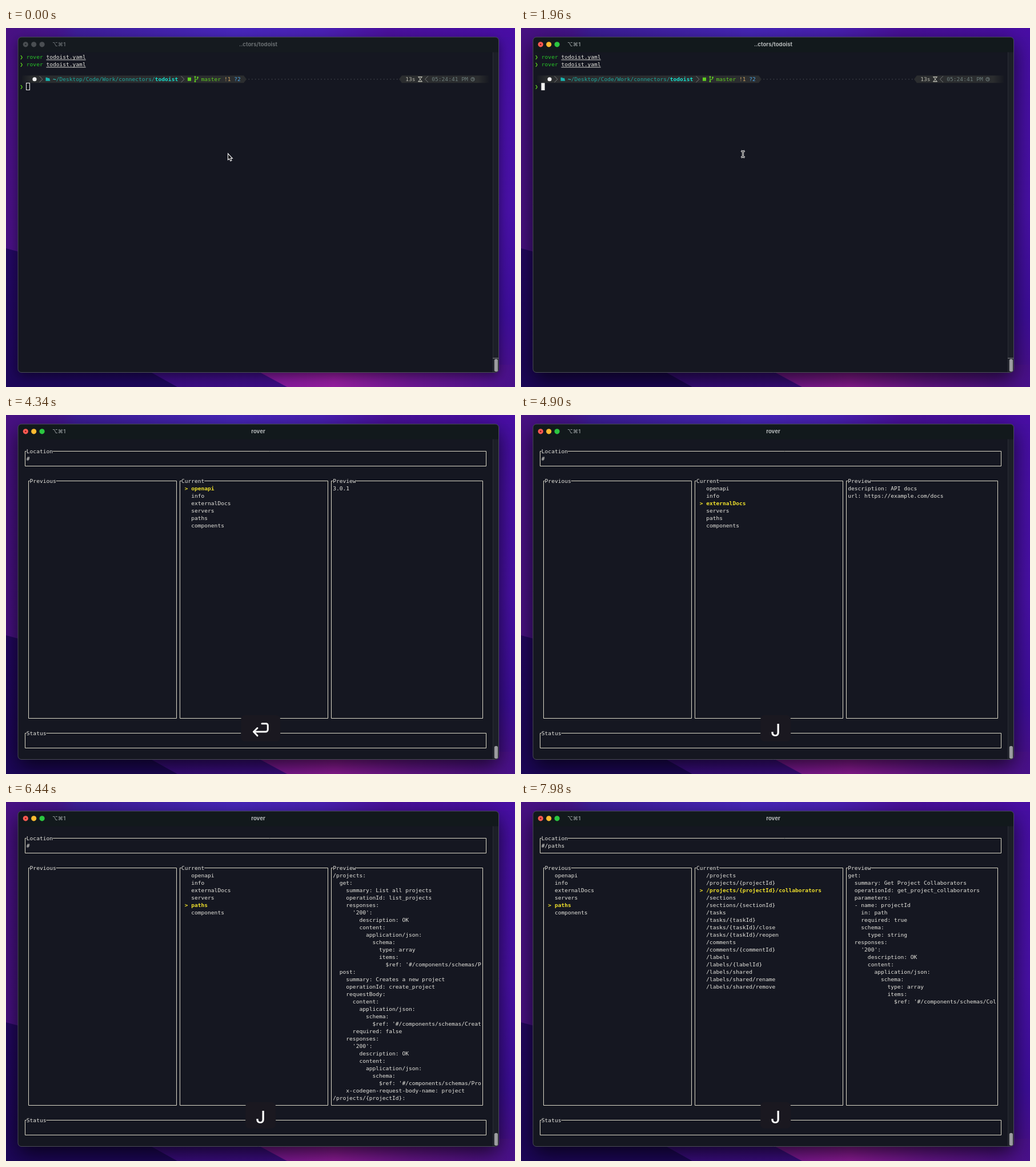
Write an HTML page with a canvas that moves like this. It is 891 px wide and 629 px high and loops after 8 s.

```html
<!DOCTYPE html>
<html lang="en">
<head>
<meta charset="utf-8">
<title>Terminal</title>
<style>
html, body { margin: 0; width: 100%; height: 100%; overflow: hidden; background: #2a0b78; }
canvas { display: block; }
</style>
</head>
<body>
<canvas id="stage" width="891" height="629"></canvas>
<script>
const ctx = document.getElementById('stage').getContext('2d');
const W = 891, H = 629, LOOP = 8000;
const CELL = 5.768, X0 = 24.3, ROW = 12.985;
const MONO = '"DejaVu Sans Mono", monospace', SANS = 'Inter, sans-serif';
const INK = '#e6e5de', FRAME = '#dcd9c8', YELLOW = '#efe02c', GREEN = '#5fd020';

const FOCUS = 1050, OPEN = 3920, ENTER = 3710, TAB = 3080, DRILL = 6510;
const TYPED = 'rover to', TYPE_START = 2100, TYPE_STEP = 115;
const ROOT_MOVES = [4620, 4900, 5180, 5460];
const PATH_MOVES = [7560, 7840];

const ROOT = ['openapi', 'info', 'externalDocs', 'servers', 'paths', 'components'];
const PATHS = ['/projects', '/projects/{projectId}', '/projects/{projectId}/collaborators',
  '/sections', '/sections/{sectionId}', '/tasks', '/tasks/{taskId}', '/tasks/{taskId}/close',
  '/tasks/{taskId}/reopen', '/comments', '/comments/{commentId}', '/labels', '/labels/{labelId}',
  '/labels/shared', '/labels/shared/rename', '/labels/shared/remove'];

const indent = (lines, n) => lines.map(s => ' '.repeat(n) + s);
const ref = name => `$ref: '#/components/schemas/${name}'`;
const content = schema => ['content:', '  application/json:', '    schema:', ...indent(schema, 6)];
const ok = schema => ['responses:', "  '200':", '    description: OK', ...indent(content(schema), 4)];
const list = name => ['type: array', 'items:', '  ' + ref(name)];
const head = (summary, id) => [`summary: ${summary}`, `operationId: ${id}`];
const param = ['parameters:', '- name: projectId', '  in: path', '  required: true',
  '  schema:', '    type: string'];

const projects = ['get:',
  ...indent([...head('List all projects', 'list_projects'), ...ok(list('Project'))], 2),
  'post:',
  ...indent([...head('Creates a new project', 'create_project'), 'requestBody:',
    ...indent(content([ref('CreateProject')]), 2), '  required: false',
    ...ok([ref('Project')]), 'x-codegen-request-body-name: project'], 2)];
const project = ['get:',
  ...indent([...head('Get a project', 'get_project'), ...param, ...ok([ref('Project')])], 2)];
const collaborators = ['get:',
  ...indent([...head('Get Project Collaborators', 'get_project_collaborators'),
    ...param, ...ok(list('Collaborator'))], 2)];

const ROOT_PREVIEW = [
  ['3.0.1'],
  ['title: REST API', 'version: 1.0.0'],
  ['description: API docs', 'url: https://example.com/docs'],
  ['- url: https://example.com/rest'],
  ['/projects:', ...indent(projects, 2), '/projects/{projectId}:']
];
const PATH_PREVIEW = [projects, project, collaborators];

// Key presses shown in the overlay
const KEYS = [
  ...[...TYPED].map((c, i) => [TYPE_START + i * TYPE_STEP, c === ' ' ? '␣' : c.toUpperCase()]),
  [TAB, 'tab'], [ENTER, 'enter'],
  ...ROOT_MOVES.map(t => [t, 'J']), [DRILL, 'L'], ...PATH_MOVES.map(t => [t, 'J'])
];

const colX = c => X0 + c * CELL;
const rowY = r => 50.8 + r * ROW;
const count = (times, t) => times.filter(k => t >= k).length;

function write(s, col, row, color = INK, bold = false) {
  ctx.font = `${bold ? 'bold ' : ''}9.58px ${MONO}`;
  ctx.textAlign = 'left';
  ctx.fillStyle = color;
  [...s].forEach((c, i) => c !== ' ' && ctx.fillText(c, colX(col + i), rowY(row) + 3.4));
}

function label(s, x, y, font, color, align = 'center') {
  ctx.font = font;
  ctx.textAlign = align;
  ctx.fillStyle = color;
  ctx.fillText(s, x, y);
}

function line(points, color, width = 1, fill) {
  ctx.beginPath();
  points.forEach(([x, y], i) => i ? ctx.lineTo(x, y) : ctx.moveTo(x, y));
  if (fill) { ctx.closePath(); ctx.fillStyle = fill; ctx.fill(); }
  if (color) { ctx.strokeStyle = color; ctx.lineWidth = width; ctx.stroke(); }
}

function dot(x, y, r, color) {
  ctx.beginPath();
  ctx.arc(x, y, r, 0, Math.PI * 2);
  ctx.fillStyle = color;
  ctx.fill();
}

function rounded(x, y, w, h, r) {
  ctx.beginPath();
  ctx.roundRect(x, y, w, h, r);
}

function ramp(x1, y1, x2, y2, ...stops) {
  const g = ctx.createLinearGradient(x1, y1, x2, y2);
  stops.forEach(([p, c]) => g.addColorStop(p, c));
  return g;
}

function wallpaper() {
  ctx.fillStyle = ramp(0, 0, W, 0, [0, '#481082'], [.1, '#45148c'], [.14, '#3d1d98'],
    [.45, '#4826bc'], [.62, '#4a20b4'], [.75, '#4a109c'], [1, '#480da4']);
  ctx.fillRect(0, 0, W, H);
  ctx.fillStyle = ramp(0, 0, 0, H, [0, '#460ea2'], [.5, '#4810a6'], [.8, '#3c0d98'], [1, '#4a1088']);
  ctx.fillRect(860, 16, 31, H);
  line([[0, 386], [60, 402], [300, 629], [0, 629]], null, 0, ramp(0, 386, 0, 629, [0, '#220760'], [1, '#1c0658']));
  line([[230, 590], [500, 590], [500, 629], [300, 629]], null, 0, ramp(260, 0, 490, 0, [0, '#3a0c80'], [1, '#3c0d82']));
  line([[420, 590], [891, 590], [891, 629], [492, 629]], null, 0,
    ramp(440, 0, 891, 0, [0, '#7c1898'], [.3, '#921c9c'], [.6, '#6a1690'], [1, '#48108a']));
}

function windowFrame(focused, title) {
  ctx.save();
  ctx.shadowColor = focused ? 'rgba(0,0,0,.72)' : 'rgba(0,0,0,.5)';
  ctx.shadowBlur = focused ? 36 : 20;
  ctx.shadowOffsetY = focused ? 12 : 6;
  rounded(21, 16, 841.5, 587.5, 6);
  ctx.fillStyle = '#151721';
  ctx.fill();
  ctx.restore();

  ctx.save();
  rounded(21, 16, 841.5, 587.5, 6);
  ctx.clip();
  ctx.fillStyle = focused ? '#12191c' : '#151a1f';
  ctx.fillRect(21, 16, 842, 26.5);
  ctx.fillStyle = '#1c1f27';
  ctx.fillRect(852, 42.5, 11, 562);
  ctx.fillStyle = '#2c2e36';
  ctx.fillRect(852, 42.5, 1, 562);
  ctx.restore();

  rounded(21, 16, 841.5, 587.5, 6);
  ctx.strokeStyle = '#4b4d57';
  ctx.lineWidth = 1;
  ctx.stroke();

  rounded(854.8, 580, 6.2, 22, 2.5);
  ctx.fillStyle = '#9b9c9f';
  ctx.fill();
  if (title !== 'rover') line([[852, 578.5], [862, 578.5]], '#85868a');

  const lights = focused ? ['#fb5a52', '#fcbb30', '#2bc740'] : ['#4a4e52', '#4a4e52', '#4a4e52'];
  lights.forEach((c, i) => dot(34.3 + i * 14.4, 28.8, 4.6, c));
  dot(34.3, 28.8, 1.2, focused ? '#7c1310' : '#202428');
  label('⌥⌘1', 81, 32.4, `600 9.6px ${SANS}`, focused ? '#8d9395' : '#686d71', 'left');
  label(title, 441.5, 32.3, `bold 9.6px ${SANS}`, focused ? '#b4b8b9' : '#696e71');
}

function promptBar() {
  const y = rowY(3), top = y - 6.6, bottom = y + 6.4, bg = '#2b2d2f';
  const left = ramp(28, 0, 46, 0, [0, '#171921'], [1, bg]);
  line([[28, top], [416, top], [421, y], [416, bottom], [28, bottom]], null, 0, left);
  const right = ramp(826, 0, 845, 0, [0, bg], [1, '#171921']);
  line([[693, top], [845, top], [845, bottom], [693, bottom], [688, y]], null, 0, right);

  const chevron = (x, d) => line([[x, top + 1], [x + 5.5 * d, y], [x, bottom - 1]], '#77797a');
  dot(50, y, 3.6, '#f2f2f2');
  chevron(58.5, 1);
  line([[69.5, y + 3], [69.5, y - 3], [72.3, y - 3], [73, y - 2], [76, y - 2], [77.3, y + 3]], null, 0, '#18b4b0');
  write('~', 10, 3, '#35dcd4', true);
  write('/Desktop/Code/Work/connectors/', 11, 3, '#1ba9a0');
  write('todoist', 41, 3, '#14e4d2', true);
  chevron(306.5, 1);
  ctx.fillStyle = GREEN;
  ctx.fillRect(318, y - 3, 6, 6);
  line([[331, y - 3.5], [331, y + 4]], GREEN, 1.1);
  line([[335.5, y - 2.5], [335.5, y - .5], [331, y + 1.5]], GREEN, 1.1);
  [[331, -4], [331, 4], [335.5, -3]].forEach(([x, d]) => dot(x, y + d, 1.4, GREEN));
  write('master', 55, 3, GREEN);
  write('!1', 62, 3, '#d0a462');
  write('?2', 65, 3, '#4ca6ea');

  for (let c = 69; c < 115; c++) {
    ctx.fillStyle = '#54575e';
    ctx.fillRect(colX(c) + 2.3, y - .6, 1.2, 1.2);
  }
  write('13s', 117, 3, '#b5b5aa');
  line([[722, y - 4], [728, y - 4], [722, y + 4], [728, y + 4], [722, y - 4]], '#c0c0b6');
  line([[721, y - 4], [729, y - 4]], '#c0c0b6');
  line([[721, y + 4], [729, y + 4]], '#c0c0b6');
  chevron(739, -1);
  write('05:24:41 PM', 125, 3, '#6c7d7c');
  ctx.beginPath();
  ctx.arc(817, y, 3.1, 0, Math.PI * 2);
  ctx.strokeStyle = '#788786';
  ctx.stroke();
  line([[817, y - 2], [817, y], [818.8, y]], '#788786');
}

function command(text, row) {
  write('❯', 0, row, GREEN);
  const word = text.slice(0, 5), rest = text.slice(6).trim();
  write(word, 2, row, word === 'rover' ? '#28c828' : '#e0524c');
  write(rest, 8, row);
  if (rest) line([[colX(8), rowY(row) + 5], [colX(8 + rest.length), rowY(row) + 5]], '#d5d5d0');
}

function mouse(focused) {
  if (focused) {
    const beam = (c, w) => {
      line([[388.5, 216.5], [388.5, 225.5]], c, w);
      [[215, 217], [227, 225]].forEach(([end, mid]) =>
        line([[385.5, end], [388.5, mid], [391.5, end]], c, w));
    };
    beam('#f4f4f4', 3);
    beam('#111', 1);
  } else {
    line([[388.5, 220], [388.5, 231], [391, 229], [393, 233], [395, 232], [393.2, 228.4],
      [396.4, 228.4], [388.5, 220]], '#f4f4f4', 1.1, '#101014');
  }
}

function shell(t) {
  const focused = t >= FOCUS;
  command('rover todoist.yaml', 0);
  command('rover todoist.yaml', 1);
  promptBar();
  const n = Math.max(0, Math.min(TYPED.length, Math.floor((t - TYPE_START) / TYPE_STEP) + 1));
  const text = t >= TAB ? 'rover todoist.yaml ' : TYPED.slice(0, n);
  command(text, 4);
  if (t < ENTER) {
    const x = colX(2 + text.length);
    ctx.fillStyle = ctx.strokeStyle = '#f2f2f2';
    ctx.lineWidth = 1;
    if (focused) ctx.fillRect(x - .4, 96.3, 6.2, 12.8);
    else ctx.strokeRect(35.5, 96.5, 6, 12);
  }
  if (t < TYPE_START) mouse(focused);
}

function panel(title, c1, r1, c2, r2) {
  const x1 = Math.round(colX(c1 + .5)) - .5 + .5, x2 = colX(c2 + .5);
  const y1 = rowY(r1) + .1, y2 = rowY(r2) + .1;
  const snap = v => Math.floor(v) + .5;
  const l = snap(x1), r = snap(x2), top = snap(y1), b = snap(y2);
  line([[colX(c1 + 1 + title.length), top], [r, top], [r, b], [l, b], [l, top], [colX(c1 + 1), top]], FRAME);
  write(title, c1 + 1, r1);
}

function menu(items, col, selected) {
  items.forEach((s, i) => {
    const on = i === selected;
    if (on) write('>', col, 6 + i, YELLOW, true);
    write(s, col + 2, 6 + i, on ? YELLOW : INK, on);
  });
}

function browser(t) {
  const inPaths = t >= DRILL;
  const root = count(ROOT_MOVES, t), path = count(PATH_MOVES, t);
  panel('Location', 1, 1, 141, 3);
  panel('Previous', 2, 5, 47, 37);
  panel('Current', 48, 5, 93, 37);
  panel('Preview', 94, 5, 140, 37);
  panel('Status', 1, 39, 141, 41);
  write(inPaths ? '#/paths' : '#', 2, 2);
  if (inPaths) menu(ROOT, 4, root);
  menu(inPaths ? PATHS : ROOT, 50, inPaths ? path : root);
  const lines = inPaths ? PATH_PREVIEW[path] : ROOT_PREVIEW[root];
  lines.slice(0, 31).forEach((s, i) => write(s.slice(0, 45), 95, 6 + i));
}

function keyOverlay(t) {
  const last = KEYS.filter(k => t >= k[0]).pop();
  if (!last) return;
  const [time, key] = last;
  const alpha = Math.max(0, Math.min(1, (1200 - (t - time)) / 200));
  if (!alpha) return;
  ctx.save();
  ctx.globalAlpha = alpha;
  const w = key.length > 1 ? 69 : 53;
  rounded(445.7 - w / 2, 526, w, 46, 7);
  ctx.fillStyle = '#1a1820';
  ctx.fill();
  const white = '#fafafa';
  if (key === 'tab') {
    line([[432, 551.3], [450, 551.3]], white, 3);
    line([[446.5, 544], [455.5, 551.3], [446.5, 558.6]], null, 0, white);
    line([[458.2, 543.5], [458.2, 559]], white, 3);
  } else if (key === 'enter') {
    ctx.lineCap = ctx.lineJoin = 'round';
    ctx.beginPath();
    ctx.moveTo(448, 540.7);
    ctx.arcTo(458.3, 540.7, 458.3, 548, 3);
    ctx.arcTo(458.3, 555, 450, 555, 4);
    ctx.lineTo(434, 555);
    ctx.strokeStyle = white;
    ctx.lineWidth = 3;
    ctx.stroke();
    line([[440, 548.5], [433.5, 555], [440, 561.8]], white, 3);
  } else {
    label(key, 445.7, 562.6, `500 30px ${SANS}`, white);
  }
  ctx.restore();
}

function draw(t) {
  const open = t >= OPEN;
  wallpaper();
  windowFrame(t >= FOCUS, open ? 'rover' : '..ctors/todoist');
  (open ? browser : shell)(t);
  keyOverlay(t);
}

const start = performance.now();
function tick() {
  draw((performance.now() - start) % LOOP);
  requestAnimationFrame(tick);
}
tick();
</script>
</body>
</html>
```
